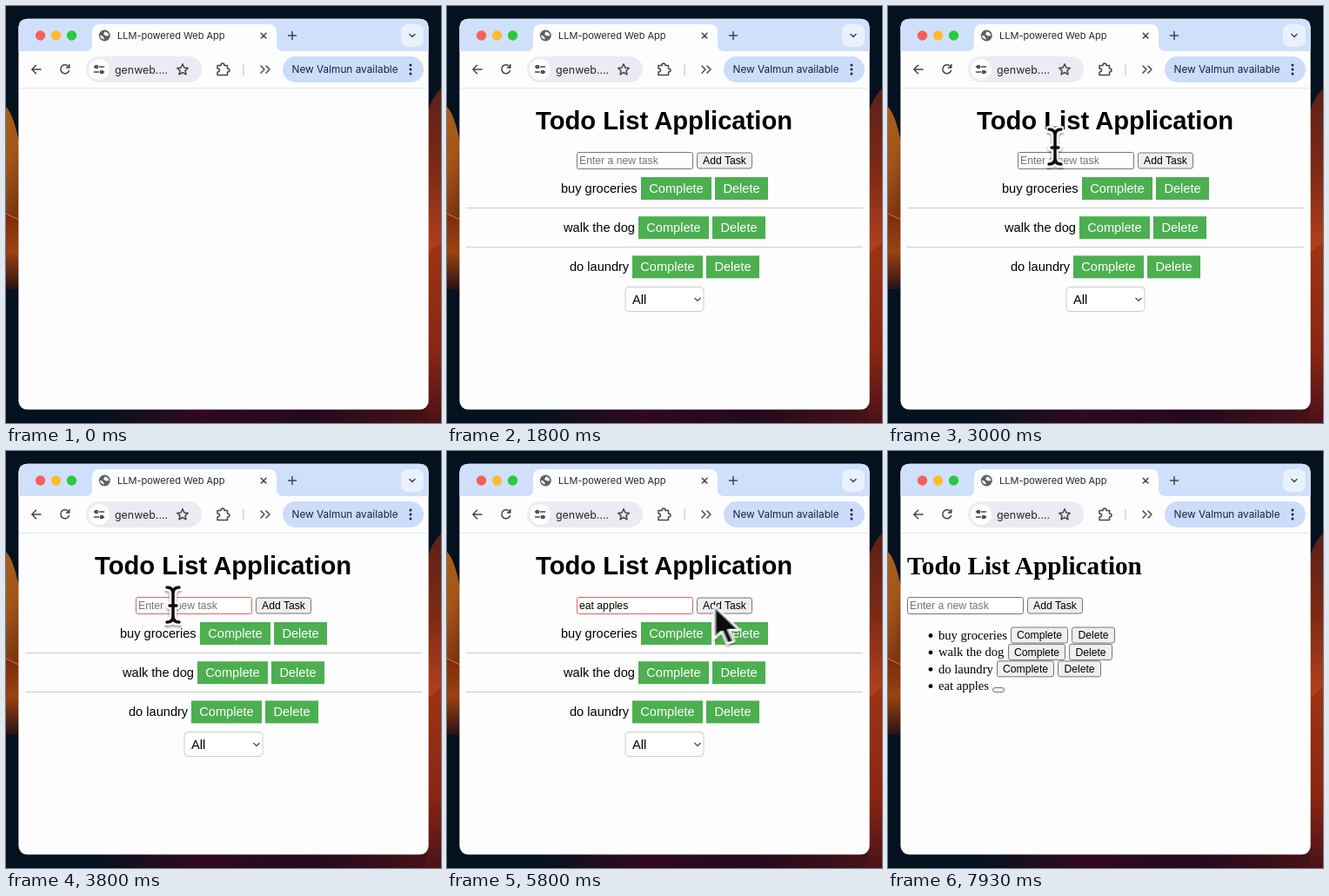
An HTML page for the animation above (8000 ms loop, 500 by 480 pixels).

```html
<!DOCTYPE html>
<html lang="en">
<head>
<meta charset="utf-8">
<title>Todo list</title>
<style>
  html, body { margin: 0; width: 100%; height: 100%; overflow: hidden; background: #04121f; }
  svg { display: block; width: 100%; height: 100%; }
  text { white-space: pre; }
  .ui { font-family: Inter, sans-serif; fill: #25272b; }
  .sans { font-family: "Liberation Sans", Arial, sans-serif; }
  .serif { font-family: "Liberation Serif", Times, serif; }
  .icon { fill: none; stroke: #43464b; stroke-width: 1.5; stroke-linecap: round; stroke-linejoin: round; }
</style>
</head>
<body>
<svg viewBox="0 0 500 480">
  <defs>
    <linearGradient id="petalA" x2=".3" y2="1">
      <stop offset="0" stop-color="#a85f17"/><stop offset=".5" stop-color="#a3551a"/><stop offset="1" stop-color="#7a3512"/>
    </linearGradient>
    <linearGradient id="petalB" x2="0" y2="1">
      <stop offset="0" stop-color="#7a2a0e"/><stop offset=".5" stop-color="#9a4310"/><stop offset="1" stop-color="#2a1216"/>
    </linearGradient>
    <linearGradient id="petalC" x2="0" y2="1">
      <stop offset="0" stop-color="#5c2018"/><stop offset=".5" stop-color="#7f2a15"/><stop offset="1" stop-color="#b8421f"/>
    </linearGradient>
    <linearGradient id="petalD" x2="0" y2="1">
      <stop offset="0" stop-color="#9c3413"/><stop offset=".6" stop-color="#8a2513"/><stop offset="1" stop-color="#4a1218"/>
    </linearGradient>
    <linearGradient id="floor">
      <stop offset=".2" stop-color="#04121f"/><stop offset=".45" stop-color="#32091f"/>
      <stop offset=".7" stop-color="#240a1c"/><stop offset="1" stop-color="#4a1218"/>
    </linearGradient>
    <filter id="shade" x="-20%" y="-20%" width="140%" height="140%">
      <feDropShadow dx="0" dy="2" stdDeviation="1.5" flood-opacity=".4"/>
    </filter>
    <filter id="smear" x="-40%" y="-40%" width="180%" height="180%">
      <feGaussianBlur id="smearBlur" stdDeviation="0"/>
    </filter>
  </defs>

  <!-- wallpaper -->
  <path fill="#04121f" d="M0 0H500V480H0Z"/>
  <path fill="url(#floor)" d="M0 460H500V480H0Z"/>
  <path fill="url(#petalA)" d="M0 116Q10 126 17 168V250H0Z"/>
  <path fill="url(#petalB)" d="M0 239L17 247V326H0Z"/>
  <path fill="none" stroke="#d67a28" d="M0 239L17 247"/>
  <path fill="url(#petalC)" d="M484 124Q490 104 500 95V290H484Z"/>
  <path fill="url(#petalD)" d="M484 285L500 272V480H484Z"/>

  <!-- browser window -->
  <rect x="14.4" y="14.7" width="471.3" height="449.9" rx="10" fill="#fdfdfd"/>
  <path fill="#cfe0fb" d="M14.400 52V24.700Q14.400 14.700 24.400 14.700H475.700Q485.700 14.700 485.700 24.700V52Z"/>
  <path fill="#fdfdfd" d="M91 52Q99 52 99 44V30Q99 21 108 21H302Q311 21 311 30V44Q311 52 319 52Z"/>
  <path stroke="#e6e7ec" d="M15 94.5H485.5"/>
  <circle cx="39.5" cy="34" r="5.700" fill="#f95f57"/>
  <circle cx="57.5" cy="34" r="5.700" fill="#fdbb2f"/>
  <circle cx="75.5" cy="34" r="5.700" fill="#2bc840"/>
  <circle cx="113.300" cy="34" r="6.500" fill="#5c6066"/>
  <path fill="#fdfdfd" d="M108 33.500L111.500 35L113 38.500Q108.500 38 108 33.500M113.500 29.500Q117.500 30 118.500 34L115 34.500L112 32.500Z"/>
  <text class="ui" x="128" y="38" font-size="11">LLM-powered Web App</text>
  <path class="icon" d="M293.200 31.200L299 37M299 31.200L293.200 37M324.500 34H333.500M329 29.500V38.500"/>
  <rect x="454" y="21" width="26" height="26" rx="8" fill="#e9f1fe"/>
  <path class="icon" d="M464 32.5L467 35.5L470 32.5"/>

  <path class="icon" d="M40 73H30M34.5 68.3L29.8 73L34.5 77.7M72.3 70.5A5 5 0 1 0 72.5 74.5M72.8 67.5V71H69.3"/>
  <rect x="92" y="58" width="133" height="30" rx="15" fill="#ebebf3"/>
  <circle cx="107" cy="73" r="12" fill="#fdfdfd"/>
  <path class="icon" d="M101.5 70H104.5M109.5 76H112.5M107.5 70H112.5M101.5 76H106.5"/>
  <circle cx="104" cy="70" r="1.6" class="icon"/>
  <circle cx="110" cy="76" r="1.6" class="icon"/>
  <text class="ui" x="125" y="77.5" font-size="12.4">genweb....</text>
  <path class="icon" d="M203 66.8L204.9 71L209.3 71.4L206 74.4L207 78.8L203 76.5L199 78.8L200 74.4L196.7 71.4L201.1 71Z"/>
  <path class="icon" d="M243 68.5H247Q247 66 249 66T251 68.5H254.5V72Q257 72 257 74T254.5 76V79.5H243V76Q245.5 76 245.5 74T243 72Z"/>
  <path stroke="#c3d6f8" stroke-width="1.5" d="M273 66.5V80"/>
  <path class="icon" d="M293 69L297 73L293 77M299 69L303 73L299 77"/>
  <rect x="318" y="58" width="162" height="30" rx="15" fill="#cbddfb"/>
  <text class="ui" x="328.5" y="77.3" font-size="11.8" style="fill:#14243f">New Valmun available</text>
  <g fill="#14243f"><circle cx="465" cy="68" r="1.5"/><circle cx="465" cy="73" r="1.5"/><circle cx="465" cy="78" r="1.5"/></g>

  <g id="page"></g>

  <g id="cursor">
    <g id="beam" filter="url(#shade)" fill="none" stroke-linecap="round">
      <g stroke="#fff" stroke-width="8"><path id="beamShape" d="M-7 -20Q0 -20 0 -13Q0 -20 7 -20M0 -13V13M-7 20Q0 20 0 13Q0 20 7 20M-4 1H4"/></g>
      <use href="#beamShape" stroke="#111" stroke-width="3.5"/>
    </g>
    <path id="arrow" filter="url(#shade)" fill="#111" stroke="#fff" stroke-width="2.5" stroke-linejoin="round"
      d="M0 0V38L9 30L15 44L23 41L17 28H29Z"/>
  </g>
</svg>
<script>
const LOOP = 8000;
const TASKS = ["buy groceries", "walk the dog", "do laundry", "eat apples"];
const TYPED = "eat apples";

// Row positions for each stage of the stylesheet
const LAYOUTS = {
  plain: { font: "serif", titleX: 22, formX: 22, textX: [58, 58, 58, 58], buttonX: [141, 138, 125, 120], top: 212, gap: 19.4 },
  centred: { font: "sans", titleX: 102, formX: 149, textX: [144, 147, 154], buttonX: [236, 233, 226], top: 207, gap: 38.7 },
  green: { font: "sans", titleX: 102, formX: 149, textX: [131, 134, 141], buttonX: [223, 220, 213], top: 210, gap: 45.2 },
};

const CURSOR_PATH = [
  [2500, 300, -50], [3000, 192, 162], [3200, 192, 177], [5300, 192, 177],
  [5900, 316, 178], [6500, 316, 178], [7100, 518, 210],
];

const $ = id => document.getElementById(id);
const text = (x, y, size, content, font = "sans", extra = "") =>
  `<text class="${font}" x="${x}" y="${y}" font-size="${size}" ${extra}>${content}</text>`;
const box = (x, y, w, h, fill, stroke = "#767676", r = 2.5) =>
  `<rect x="${x + .5}" y="${y + .5}" width="${w - 1}" height="${h - 1}" rx="${r}" fill="${fill}" stroke="${stroke}"/>`;
const chevron = (x, y) =>
  `<path d="M${x - 3.5} ${y - 2}l3.5 3.5l3.5 -3.5" fill="none" stroke="#444" stroke-width="1.2"/>`;

function button(x, cy, w, label, green) {
  const face = green
    ? `<rect x="${x}" y="${cy - 13}" width="${w}" height="26" fill="#4caf50"/>`
    : box(x, cy - 9.5, w, 19, "#efefef");
  return face + text(x + w / 2, cy + (green ? 5 : 4.3), green ? 14.6 : 12.2, label, "sans",
    `text-anchor="middle" fill="${green ? "#fff" : "#000"}"`);
}

function form(x, value, focused) {
  return box(x, 168, 134, 20, "#fff", focused ? "#e0675c" : "#767676", 2) +
    text(x + 3, 182.3, 12.2, value || "Enter a new task", "sans", `fill="${value ? "#000" : "#757575"}"`) +
    button(x + 138, 178, 64, "Add Task");
}

function row(layout, name, i, parts) {
  const { textX, buttonX, top, gap, font } = LAYOUTS[layout];
  const green = layout === "green", cy = top + i * gap, x = buttonX[i];
  const [wide, narrow] = green ? [81, 61] : [66, 50];
  let out = text(textX[i], cy + 4.8, 14.6, name, font);
  if (layout === "plain") out += `<circle cx="49" cy="${cy + .5}" r="2.4"/>`;
  if (layout === "centred" || green && i < 2)
    out += `<path stroke="#ccc" d="M22 ${Math.floor(cy + (green ? 22.5 : 19)) + .5}H478"/>`;
  if (parts === 1) return out + box(x, cy + 1.8, 14, 6, "#efefef");
  out += button(x, cy, wide, "Complete", green);
  if (parts > 2) out += button(x + wide + 4, cy, narrow, "Delete", green);
  return out;
}

function filter(layout) {
  if (layout === "green")
    return box(204.5, 323, 91, 29, "#fff", "#ccc", 4) + text(213, 342.5, 14.6, "All") + chevron(288, 338);
  const [x, y] = layout === "plain" ? [22, 276] : [210.5, 305];
  return box(x, y, 79, 17.5, "#fff") + text(x + 4, y + 13, 12.2, "All") + chevron(x + 71, y + 9);
}

// `pieces` counts what has streamed in: title, form, then three pieces per row
function page(layout, pieces, taskCount, value, focused) {
  const { titleX, formX, font } = LAYOUTS[layout];
  let out = "";
  if (pieces > 0) out += text(titleX, 141.5, 29.2, "Todo List Application", font, 'font-weight="700"');
  if (pieces > 1) out += form(formX, value, focused);
  TASKS.slice(0, taskCount).forEach((name, i) => {
    const parts = Math.min(3, pieces - 2 - 3 * i);
    if (parts > 0) out += row(layout, name, i, parts);
  });
  if (taskCount === 3 && pieces > 11) out += filter(layout);
  return out;
}

const streamed = (t, start, step) => Math.max(0, Math.min(12, 1 + Math.floor((t - start) / step)));

function pageAt(t) {
  if (t >= 7000) return page("plain", streamed(t, 7120, 68), 4, "", false);
  if (t < 750) return page("plain", streamed(t, 130, 50), 3, "", false);
  const letters = Math.max(0, Math.floor((t - 3850) / 130));
  return page(t < 1400 ? "centred" : "green", 12, 3, TYPED.slice(0, letters), t > 3450 && t < 6200);
}

function cursorAt(t) {
  const next = CURSOR_PATH.findIndex(key => key[0] > t);
  if (next < 1) return null;
  const [t0, x0, y0] = CURSOR_PATH[next - 1], [t1, x1, y1] = CURSOR_PATH[next];
  const p = (t - t0) / (t1 - t0), eased = p * p * (3 - 2 * p);
  return [x0 + (x1 - x0) * eased, y0 + (y1 - y0) * eased];
}

function drawCursor(t) {
  const now = cursorAt(t);
  $("cursor").style.display = now ? "" : "none";
  if (!now) return;
  const [x, y] = now, before = cursorAt(t - 10) || now;
  const [blurX, blurY] = [x - before[0], y - before[1]].map(d => Math.min(4, Math.abs(d) * .7));
  const overText = x < 284 && y > 110 && y < 190;
  $("beam").style.display = overText ? "" : "none";
  $("arrow").style.display = overText ? "none" : "";
  $("cursor").setAttribute("transform", `translate(${x} ${y})`);
  $("smearBlur").setAttribute("stdDeviation", `${blurX} ${blurY}`);
  $("cursor").style.filter = blurX + blurY > 1 ? "url(#smear)" : "none";
}

let shown;
function draw() {
  const t = performance.now() % LOOP;
  const markup = pageAt(t);
  if (markup !== shown) $("page").innerHTML = shown = markup;
  drawCursor(t);
  requestAnimationFrame(draw);
}
draw();
</script>
</body>
</html>
```
